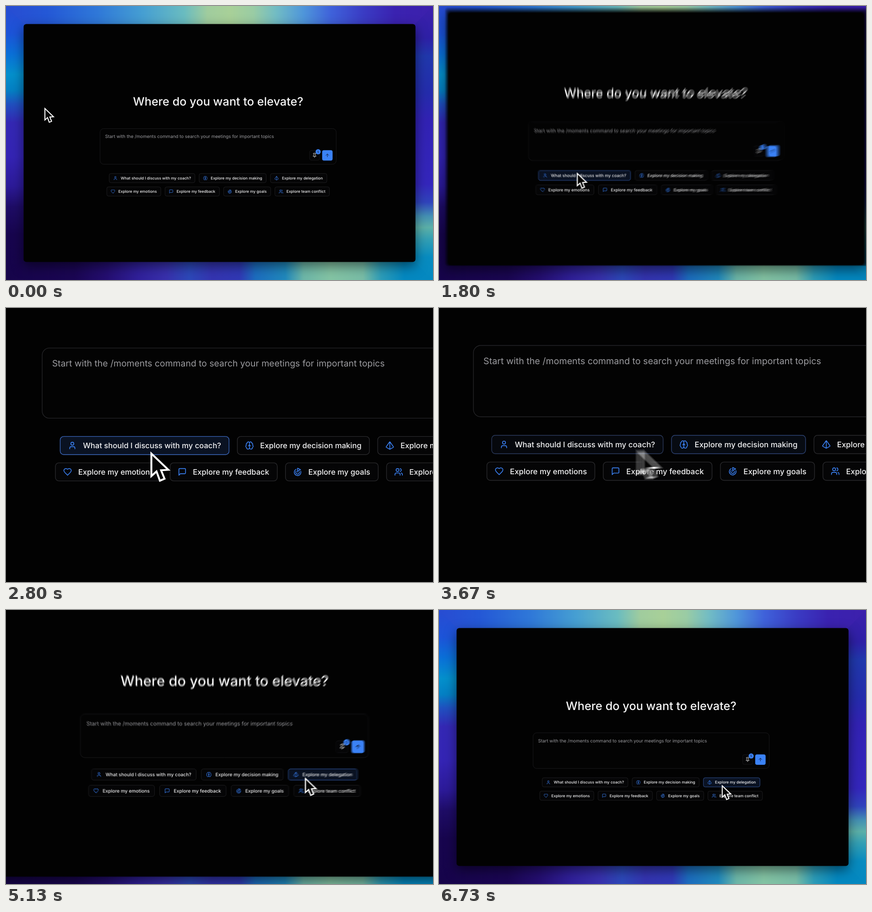
An HTML page with a canvas that plays this animation: 933 px wide and 600 px high, repeating every 6.79 s.

```html
<!DOCTYPE html>
<html lang="en">
<head>
<meta charset="utf-8">
<title>Where do you want to elevate?</title>
<style>
  html, body { margin: 0; width: 100%; height: 100%; overflow: hidden; background: #020202; }
  canvas { display: block; width: 933px; height: 600px; }
</style>
</head>
<body>
<canvas id="stage" width="933" height="600"></canvas>
<script>
const W = 933, H = 600, LOOP = 6790, STEP = 200 / 3;
const SHUTTER = 20, SAMPLES = 8;
const BLUE = '#3b82f6', EDGE = '#2a2a2d';
const FONT = 'Inter, "Liberation Sans", sans-serif';
const REM = 0.7025; // one CSS pixel of the pictured page

const view = document.getElementById('stage').getContext('2d');
const layer = newLayer(), backdrop = newLayer();

function newLayer() {
  const c = document.createElement('canvas');
  c.width = W;
  c.height = H;
  return c.getContext('2d');
}

const clamp = v => Math.max(0, Math.min(1, v));
const mix = (a, b, p) => a + (b - a) * p;
const ramp = (t, start, len) => clamp((t - start) / len);

// Critically damped spring from 0 to 1; t in ms, w in 1/s.
function spring(t, start, w) {
  const x = Math.max(0, t - start) / 1000 * w;
  return 1 - (1 + x) * Math.exp(-x);
}

// Icons on a 24-unit grid.
const circle = (x, y, r) => `M${x - r} ${y}a${r} ${r} 0 1 0 ${2 * r} 0a${r} ${r} 0 1 0 ${-2 * r} 0`;
const ICONS = {
  user: 'M19 21v-2a4 4 0 0 0-4-4H9a4 4 0 0 0-4 4v2' + circle(12, 7, 4),
  pyramid: 'M2.5 16.9a1 1 0 0 1-.3-1.4l9-13a1 1 0 0 1 1.6 0l9 13a1 1 0 0 1-.3 1.4l-8.5 4.8a2 2 0 0 1-2 0ZM12 2v20',
  heart: 'M19 14c1.5-1.5 3-3.2 3-5.5A5.5 5.5 0 0 0 16.5 3c-1.8 0-3 .5-4.5 2-1.5-1.5-2.7-2-4.5-2A5.5 5.5 0 0 0 2 8.5c0 2.3 1.5 4 3 5.5l7 7Z',
  message: 'M21 15a2 2 0 0 1-2 2H7l-4 4V5a2 2 0 0 1 2-2h14a2 2 0 0 1 2 2z',
  goal: 'M12 13V2l8 4-8 4M20.6 10.2a9 9 0 1 1-12.6-5.3M8 10a5 5 0 1 0 8.9 2',
  users: 'M16 21v-2a4 4 0 0 0-4-4H6a4 4 0 0 0-4 4v2M22 21v-2a4 4 0 0 0-3-3.9M16 3.1a4 4 0 0 1 0 7.8' + circle(9, 7, 4),
  pin: 'M12 17v5M9 10.8a2 2 0 0 1-1.1 1.8l-1.8.9A2 2 0 0 0 5 15.2V16a1 1 0 0 0 1 1h12a1 1 0 0 0 1-1v-.8a2 2 0 0 0-1.1-1.8l-1.8-.9A2 2 0 0 1 15 10.8V7a1 1 0 0 1 1-1 2 2 0 0 0 0-4H8a2 2 0 0 0 0 4 1 1 0 0 1 1 1z',
  arrow: 'M5 12l7-7 7 7M12 19V5'
};
for (const k in ICONS) ICONS[k] = new Path2D(ICONS[k]);

const lobe = new Path2D('M12 5a3 3 0 1 0-6 .1 4 4 0 0 0-2.5 5.8 4 4 0 0 0 .5 6.6A4 4 0 1 0 12 18Z');
ICONS.brain = new Path2D('M15 13a4.5 4.5 0 0 1-3-4 4.5 4.5 0 0 1-3 4');
ICONS.brain.addPath(lobe);
ICONS.brain.addPath(lobe, new DOMMatrix([-1, 0, 0, 1, 24, 0]));

const ROW1 = 366.5, ROW2 = 395.8;
const CHIPS = [
  ['user', 'What should I discuss with my coach?', 225.2, 413.2, ROW1],
  ['brain', 'Explore my decision making', 421.7, 568.9, ROW1],
  ['pyramid', 'Explore my delegation', 577.4, 701.5, ROW1],
  ['heart', 'Explore my emotions', 219.9, 338.6, ROW2],
  ['message', 'Explore my feedback', 347.1, 466.7, ROW2],
  ['goal', 'Explore my goals', 475.1, 578.7, ROW2],
  ['users', 'Explore team conflict', 587.2, 707, ROW2]
];

// Cursor legs: start time, stiffness, destination.
const LEGS = [
  [100, 6, 73, 233],
  [1260, 7.5, 325.7, 383.4],
  [3492, 7.5, 488.5, 378.9],
  [4580, 7.5, 617.8, 382.4]
];

function pose(t) {
  const zin = spring(t, 1710, 4.9), zout = spring(t, 4550, 4.9);
  const s = 1 + zin * (1 - zout);
  const fx = 336 + 83 * zout, fy = 455;
  let x = 84, y = 222;
  for (const [start, w, tx, ty] of LEGS) {
    const p = spring(t, start, w);
    x = mix(x, tx, p);
    y = mix(y, ty, p);
  }
  return {
    s, x, y,
    dx: fx * (1 - s),
    dy: fy * (1 - s),
    shift: t < 3900 ? 0 : 0.5,
    hover: [
      ramp(t, 1540, 150) - ramp(t, 3570, 150),
      ramp(t, 3590, 150) - ramp(t, 4720, 150),
      ramp(t, 4740, 150)
    ]
  };
}

// Bounds are the outer edges; the border lies inside them.
function box(c, x0, y0, x1, y1, r, fill, line) {
  const inset = line ? REM / 2 : 0;
  c.beginPath();
  c.roundRect(x0 + inset, y0 + inset, x1 - x0 - 2 * inset, y1 - y0 - 2 * inset, r - inset);
  c.fillStyle = fill;
  c.fill();
  if (line) {
    c.strokeStyle = line;
    c.lineWidth = REM;
    c.stroke();
  }
}

function icon(c, name, cx, cy, color, size = 14 * REM) {
  c.save();
  c.translate(cx - size / 2, cy - size / 2);
  c.scale(size / 24, size / 24);
  c.strokeStyle = color;
  c.lineWidth = 2;
  c.lineCap = c.lineJoin = 'round';
  c.stroke(ICONS[name]);
  c.restore();
}

function text(c, str, x, y, size, weight, color) {
  c.font = `${weight} ${size * REM}px ${FONT}`;
  c.fillStyle = color;
  c.fillText(str, x, y);
}

function drawChip(c, [name, label, x0, x1, y], hot) {
  const mid = y + 10.4;
  box(c, x0, y, x1, y + 20.8, 4.2, '#050506', EDGE);
  if (hot > 0) {
    c.globalAlpha = hot;
    box(c, x0, y, x1, y + 20.8, 4.2, '#0a1222', '#3865bb');
    c.globalAlpha = 1;
  }
  icon(c, name, x0 + 13.8, mid, BLUE);
  text(c, label, x0 + 25.6, mid + 3.1, 12, 500, '#f4f4f5');
}

function drawPanel(c, p) {
  c.save();
  c.shadowColor = 'rgba(0,0,0,.5)';
  c.shadowBlur = 26;
  c.shadowOffsetY = 9;
  box(c, 38.5, 39.5, 894.7, 560.5, 6, '#020202');
  c.restore();

  c.translate(0, p.shift);
  text(c, 'Where do you want to elevate?', 277.4, 218.1, 36, 500, '#f7f7f7');
  box(c, 205.2, 268.1, 721.9, 346.9, 8.4, '#030303', '#252528');
  text(c, 'Start with the /moments command to search your meetings for important topics',
    216.5, 289.1, 14, 400, '#9c9ca0');

  box(c, 663, 316, 685.5, 338, 4, '#050506', '#1f1f22');
  icon(c, 'pin', 674.2, 327, '#f2f2f3', 11);
  c.beginPath();
  c.arc(682, 319.2, 5.6, 0, 7);
  c.fillStyle = BLUE;
  c.fill();
  c.textAlign = 'center';
  text(c, '5', 682, 321.7, 10, 500, '#10244d');
  c.textAlign = 'left';
  box(c, 690.8, 315.8, 713.6, 338.6, 4, BLUE);
  icon(c, 'arrow', 702.2, 327.2, '#0c1730', 11);

  CHIPS.forEach((chip, i) => drawChip(c, chip, p.hover[i] || 0));
  c.translate(0, -p.shift);
}

function drawCursor(c, x, y) {
  c.save();
  c.translate(x, y);
  c.beginPath();
  c.moveTo(1, 2.5);
  c.lineTo(1, 27.5);
  c.lineTo(6.7, 22.3);
  c.lineTo(10.5, 32.6);
  c.lineTo(15.6, 30.4);
  c.lineTo(11.8, 21);
  c.lineTo(19.8, 20.5);
  c.closePath();
  c.fillStyle = '#050505';
  c.fill();
  c.strokeStyle = '#fff';
  c.lineWidth = 2.1;
  c.lineJoin = 'miter';
  c.stroke();
  c.restore();
}

// Each stop is "position hex".
function gradient(c, vertical, len, stops) {
  const g = vertical ? c.createLinearGradient(0, 0, 0, len) : c.createLinearGradient(0, 0, len, 0);
  for (const stop of stops.split(',')) {
    const [at, hex] = stop.trim().split(' ');
    g.addColorStop(at / len, '#' + hex);
  }
  return g;
}

function side(c, x, fill) {
  c.beginPath();
  c.moveTo(x, 0);
  c.lineTo(Math.abs(x - 60), 60);
  c.lineTo(Math.abs(x - 60), H - 60);
  c.lineTo(x, H);
  c.fillStyle = fill;
  c.fill();
}

function paintBackdrop(c) {
  c.fillStyle = gradient(c, false, W,
    '0 284cd2, 90 2458d6, 200 2f78d8, 300 469fd2, 390 6abcc0, 440 a0cc9e, 490 a8d098, 540 9acca4, 590 72bcc4, 650 4f96da, 710 3f62da, 780 3a3cc4, 850 3a22b0, 933 3c20ac');
  c.fillRect(0, 0, W, 80);
  c.fillStyle = gradient(c, false, W,
    '0 16044a, 150 1a0652, 220 240e70, 290 30209a, 350 3830ac, 400 2c48b8, 450 3434b0, 510 3038b4, 545 1c6cbe, 610 2088bc, 650 6cb6a8, 710 84c4a4, 780 78bca6, 820 2c9cb8, 870 0488c0, 933 0488c0');
  c.fillRect(0, H - 80, W, 80);
  side(c, 0, gradient(c, true, H,
    '0 284cd2, 60 1c54d8, 105 0a70d8, 150 0490cc, 185 0480c4, 215 2050c0, 255 3428b4, 330 3424b4, 395 2c1a98, 440 1e0c66, 500 17054e, 600 16044a'));
  side(c, W, gradient(c, true, H,
    '0 3c20ac, 70 2e20a6, 110 2038ac, 190 242cac, 250 3222b4, 390 3426bc, 430 3044bc, 460 4490b4, 485 5cb0a8, 510 34a0b4, 550 088cc0, 600 0488c0'));
}

function drawScene(c, p) {
  c.setTransform(1, 0, 0, 1, 0, 0);
  c.drawImage(backdrop.canvas, 0, 0);
  c.setTransform(p.s, 0, 0, p.s, p.dx, p.dy);
  drawPanel(c, p);
  drawCursor(c, p.x, p.y);
}

function travel(a, b) {
  return Math.abs(a.s - b.s) * 560 + Math.hypot(a.x - b.x, a.y - b.y) * a.s;
}

function render(t) {
  if (travel(pose(t - SHUTTER / 2), pose(t + SHUTTER / 2)) < 1.5) {
    drawScene(view, pose(t));
    return;
  }
  // Average several moments for motion blur.
  view.setTransform(1, 0, 0, 1, 0, 0);
  for (let i = 0; i < SAMPLES; i++) {
    drawScene(layer, pose(t + SHUTTER * (i / (SAMPLES - 1) - 0.5)));
    view.globalAlpha = 1 / (i + 1);
    view.drawImage(layer.canvas, 0, 0);
  }
  view.globalAlpha = 1;
}

view.textRendering = layer.textRendering = 'geometricPrecision';
paintBackdrop(backdrop);

const begin = performance.now();
let last = -1;
function tick() {
  const t = (performance.now() - begin) % LOOP;
  const step = Math.floor((t + 5) / STEP);
  if (step !== last) {
    last = step;
    render(Math.min(step, 101) * STEP);
  }
  requestAnimationFrame(tick);
}
tick();
</script>
</body>
</html>
```
